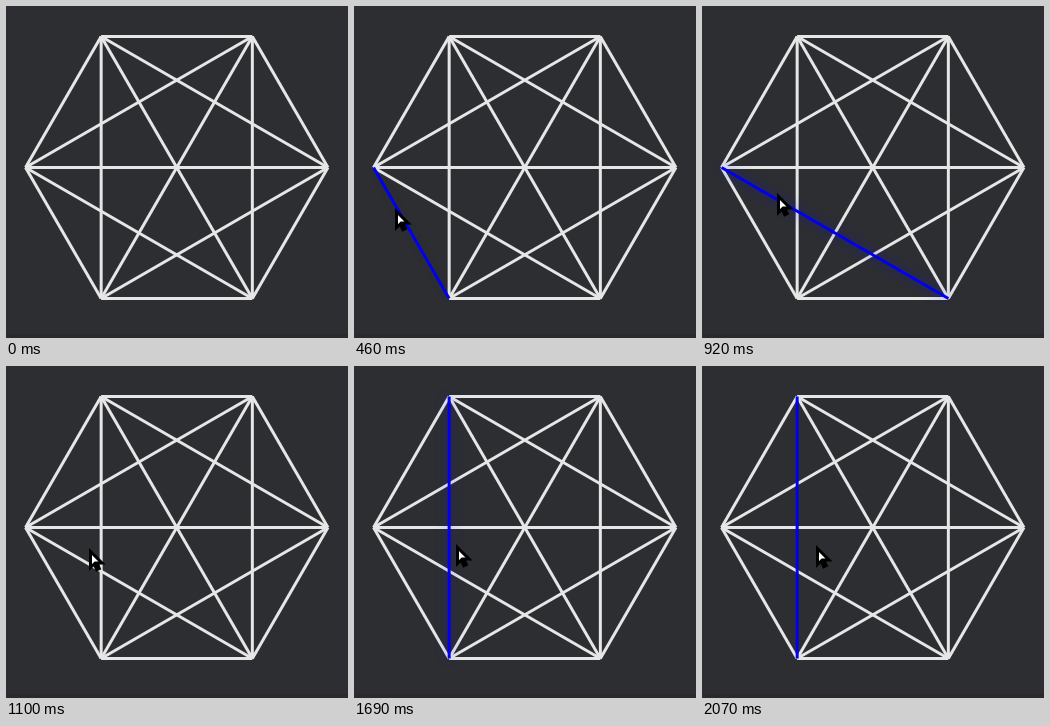
These frames come from a looping animation (342 by 332 pixels, 2.22 s). An HTML page with a canvas:

```html
<!DOCTYPE html>
<html lang="en">
<head>
<meta charset="utf-8">
<title>Hexagon edges</title>
<style>
html, body { margin: 0; height: 100%; overflow: hidden; background: #2d2e32; }
canvas { display: block; }
</style>
</head>
<body>
<canvas id="stage" width="342" height="332"></canvas>
<script>
const ctx = document.getElementById("stage").getContext("2d");
const LOOP = 2220, PULSE = 650;

// Hexagon corners, clockwise from the left one
const corners = Array.from({ length: 6 }, (_, i) => {
  const a = Math.PI * (1 + i / 3);
  return [170.75 + 151.2 * Math.cos(a), 161.5 + 151.2 * Math.sin(a)];
});

const hovers = [
  { from: 440, to: 600, a: 0, b: 5 },
  { from: 600, to: 1060, a: 0, b: 4 },
  { from: 1220, to: LOOP, a: 1, b: 5 }
];

// Key points of the pointer tip
const path = [
  { t: 320, x: -10, y: 212 },
  { t: 460, x: 42, y: 205 },
  { t: 720, x: 66, y: 195 },
  { t: 1100, x: 84, y: 185 },
  { t: 1290, x: 97, y: 180 },
  { t: 1510, x: 97, y: 180 },
  { t: 2070, x: 115, y: 182 }
];

const arrow = new Path2D("M.5 .5V16.5L4.2 13L6.8 18.7L9.3 17.6L6.8 12H12Z");

function edge(a, b, color) {
  ctx.strokeStyle = color;
  ctx.lineWidth = 3;
  ctx.beginPath();
  ctx.moveTo(...corners[a]);
  ctx.lineTo(...corners[b]);
  ctx.stroke();
}

// A highlighted edge glows up and down once
function highlight({ from, a, b }, t) {
  const age = Math.min(1, (t - from) / PULSE);
  ctx.save();
  ctx.shadowColor = `rgba(0, 0, 255, ${0.5 * Math.sin(Math.PI * age)})`;
  ctx.shadowBlur = 12;
  edge(a, b, "#0000f0");
  ctx.restore();
}

function pointer(t) {
  if (t < path[0].t) return;
  const i = Math.max(1, path.findIndex(p => p.t > t));
  const [p, q] = t < path.at(-1).t ? [path[i - 1], path[i]] : path.slice(-2);
  const k = Math.min(1, (t - p.t) / (q.t - p.t));
  const mix = (u, v) => Math.round(u + (v - u) * k);
  ctx.save();
  ctx.translate(mix(p.x, q.x), mix(p.y, q.y));
  ctx.fillStyle = "#fff";
  ctx.strokeStyle = "#000";
  ctx.fill(arrow);
  ctx.stroke(arrow);
  ctx.restore();
}

function draw(t) {
  ctx.fillStyle = "#2d2e32";
  ctx.fillRect(0, 0, 342, 332);
  ctx.fillStyle = "#2a2a2d";
  ctx.fillRect(0, 328, 342, 4);

  const hover = hovers.find(h => t >= h.from && t < h.to);
  for (let a = 0; a < 6; a++)
    for (let b = a + 1; b < 6; b++)
      if (a !== hover?.a || b !== hover.b) edge(a, b, "#e6e6e6");
  if (hover) highlight(hover, t);
  pointer(t);
}

const start = performance.now();
function tick() {
  draw((performance.now() - start) % LOOP);
  requestAnimationFrame(tick);
}
tick();
</script>
</body>
</html>
```
